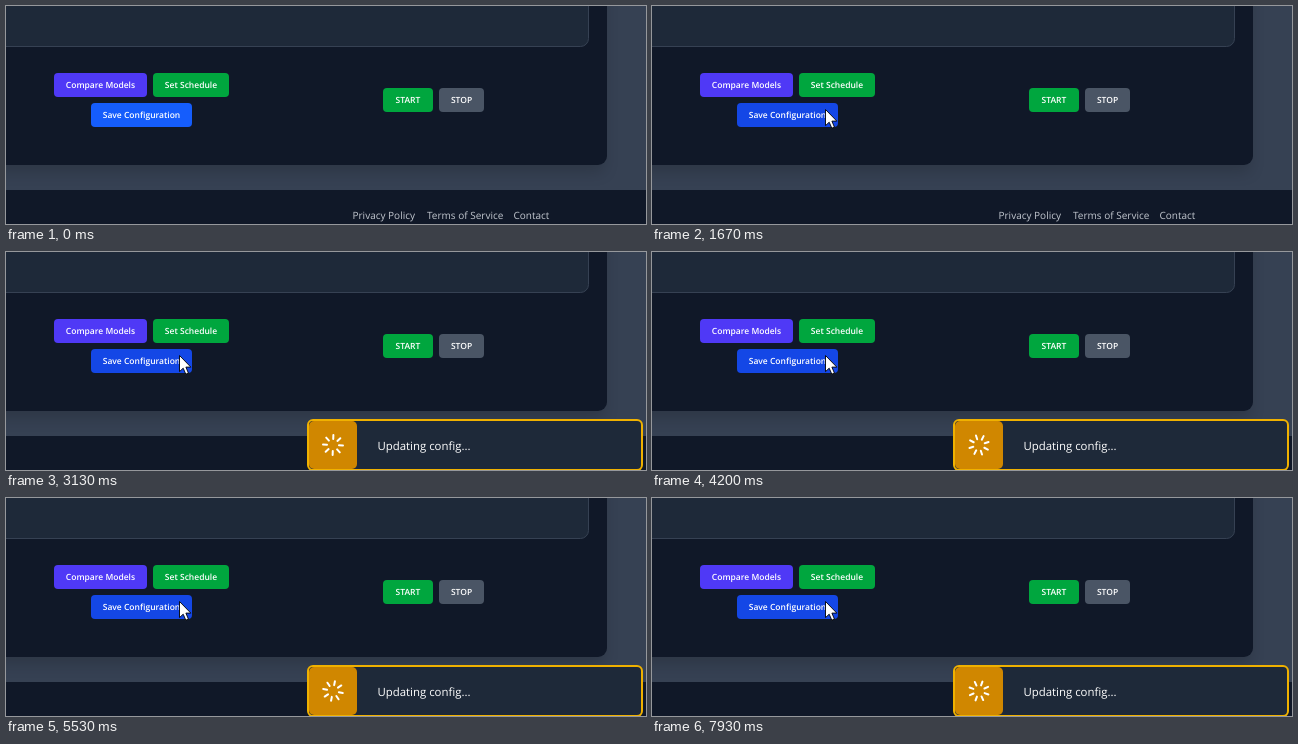
Write an HTML page that moves like this. It is 640x218 px and loops after 8 s.

```html
<!DOCTYPE html>
<html lang="en">
<head>
<meta charset="utf-8">
<title>Saving a configuration</title>
<style>
  html, body { margin: 0; width: 100%; height: 100%; overflow: hidden; background: #364153; }
  svg { display: block; width: 640px; height: 218px; }
  text { font-family: "Open Sans", "Noto Sans", sans-serif; text-rendering: geometricPrecision; fill: #fff; }
  .label { font-size: 8.5px; font-weight: 600; text-anchor: middle; }
  .link { font-size: 10px; fill: #c2c7cf; }
</style>
</head>
<body>
<svg viewBox="0 0 640 218">
  <defs>
    <filter id="blur" x="-20%" y="-20%" width="140%" height="140%"><feGaussianBlur stdDeviation="8"/></filter>
  </defs>

  <rect width="640" height="218" fill="#364153"/>
  <rect x="-60" y="-60" width="658" height="226" fill="#000" opacity=".16" filter="url(#blur)"/>
  <rect x="-20" y="-20" width="621" height="179" rx="9" fill="#101828"/>
  <rect x="-20.5" y="-20.5" width="603" height="61" rx="8" fill="#1e2939" stroke="#364153"/>

  <g id="buttons"></g>

  <rect y="184" width="640" height="34" fill="#101828"/>
  <text class="link" x="346.5" y="213">Privacy Policy</text>
  <text class="link" x="421" y="213">Terms of Service</text>
  <text class="link" x="507.5" y="213">Contact</text>

  <g id="toast">
    <rect x="302" y="168" width="334" height="50" rx="5" fill="#1e2939" stroke="#f0b100" stroke-width="2"/>
    <rect x="303" y="169" width="48" height="48" rx="5" fill="#d08700"/>
    <g id="spinner" stroke="#fff" stroke-width="2" stroke-linecap="round"></g>
    <text x="371.5" y="198" font-size="11.4">Updating config...</text>
  </g>

  <path id="cursor" d="M.5 .5V16.6L4.2 13.2 6.8 19.2 9.4 18 6.9 12.1H11.8Z" fill="#fff" stroke="#000" stroke-width=".9"/>
</svg>
<script>
const LOOP = 8000;
const CURSOR_START = 470;
const HOVER_START = 1510;
const TOAST_START = 2270;
const SVG_NS = "http://www.w3.org/2000/svg";
const byId = id => document.getElementById(id);

function add(parent, tag, attributes) {
  const element = document.createElementNS(SVG_NS, tag);
  for (const name in attributes) element.setAttribute(name, attributes[name]);
  return parent.appendChild(element);
}

function addButton(label, x, y, width, fill) {
  const rect = add(byId("buttons"), "rect", { x, y, width, height: 24, rx: 4, fill });
  add(byId("buttons"), "text", { class: "label", x: x + width / 2, y: y + 15.2 }).textContent = label;
  return rect;
}

addButton("Compare Models", 48, 67, 93, "#4f39f6");
addButton("Set Schedule", 147, 67, 76, "#00a63e");
const saveButton = addButton("Save Configuration", 85, 97, 101, "#155dfc");
addButton("START", 377, 82, 50, "#00a63e");
addButton("STOP", 433, 82, 45, "#4a5565");

for (let angle = 0; angle < 360; angle += 45) {
  add(byId("spinner"), "path", { d: "M0 -10V-6", transform: `rotate(${angle})` });
}

const progress = (time, start, duration) => Math.min(1, Math.max(0, (time - start) / duration));
const mix = (from, to, amount) => from + (to - from) * amount;
const easeOut = (amount, power) => 1 - (1 - amount) ** power;
const show = (element, visible) => element.setAttribute("visibility", visible ? "visible" : "hidden");

function draw(time) {
  const x = mix(636, 173, easeOut(progress(time, CURSOR_START, 1200), 1.77));
  const y = mix(208, 103, easeOut(progress(time, CURSOR_START, 850), 2));
  byId("cursor").setAttribute("transform", `translate(${x} ${y})`);
  show(byId("cursor"), time >= CURSOR_START);

  const hover = progress(time, HOVER_START, 150);
  const blue = [[21, 20], [93, 71], [252, 230]].map(([from, to]) => Math.round(mix(from, to, hover)));
  saveButton.setAttribute("fill", `rgb(${blue})`);

  const rise = easeOut(progress(time, TOAST_START, 300), 2);
  byId("toast").setAttribute("transform", `translate(0 ${mix(48, 0, rise)})`);
  show(byId("toast"), time >= TOAST_START);
  byId("spinner").setAttribute("transform", `translate(327 193) rotate(${time * 0.36})`);
}

const startTime = performance.now();
function tick() {
  draw((performance.now() - startTime) % LOOP);
  requestAnimationFrame(tick);
}
tick();
</script>
</body>
</html>
```
